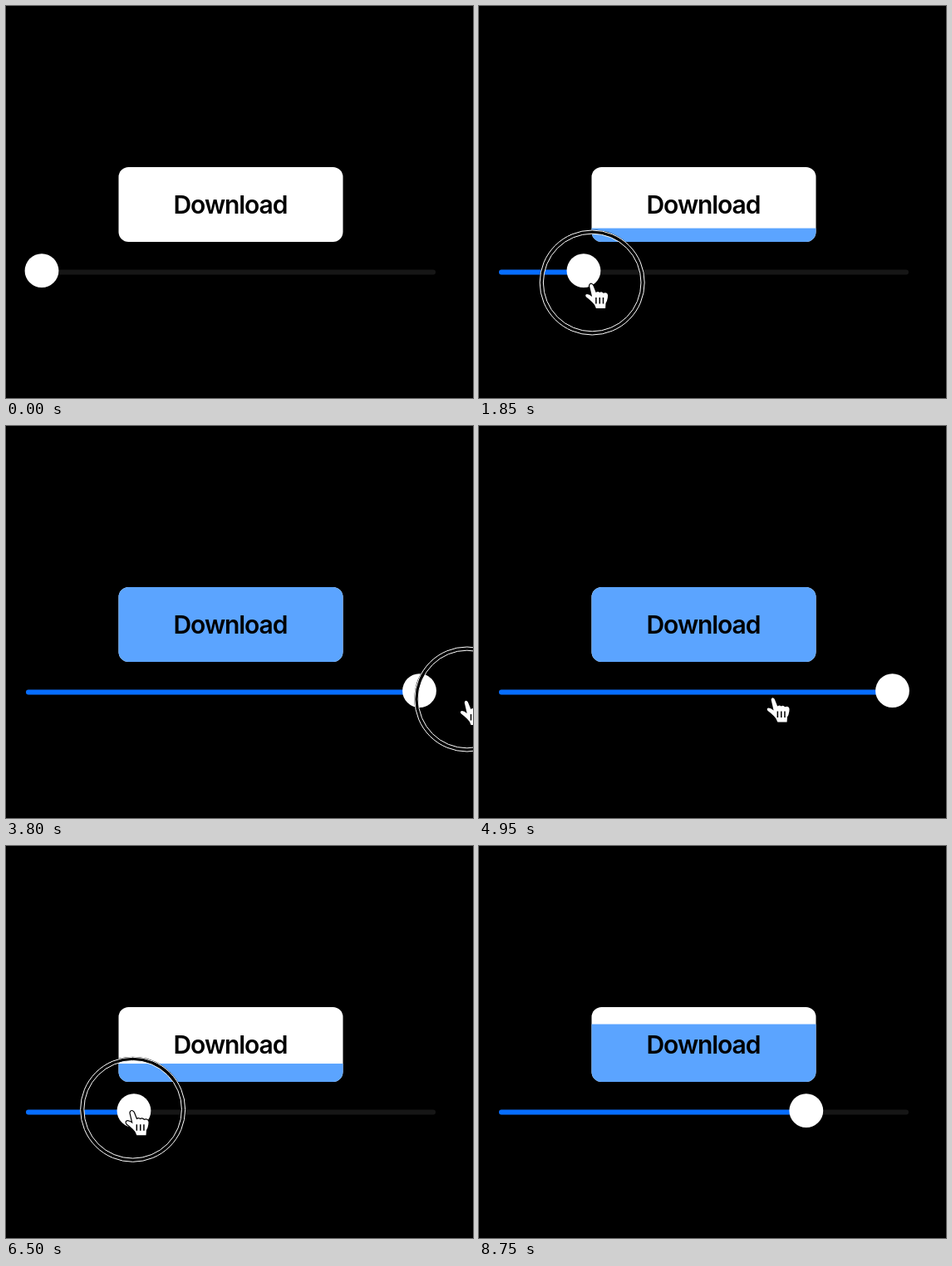
Write an HTML page that moves like this. It is 562 px wide and 472 px high and loops after 9.4 s.

```html
<!DOCTYPE html>
<html lang="en">
<head>
<meta charset="utf-8">
<title>Download slider</title>
<style>
  html, body { margin: 0; width: 100%; height: 100%; overflow: hidden; background: #000; }
  svg { display: block; width: 562px; height: 472px; }
  text { font: 580 30px Inter, "Liberation Sans", sans-serif; letter-spacing: -0.035em; }
</style>
</head>
<body>
<svg viewBox="0 0 562 472">
  <defs>
    <clipPath id="card"><rect x="135.5" y="194" width="270" height="90" rx="12"/></clipPath>
  </defs>
  <g clip-path="url(#card)">
    <rect x="135" y="194" width="271" height="90" fill="#fff"/>
    <rect id="level" x="135" y="284" width="271" height="91" fill="#5ba4ff"/>
  </g>
  <text x="270" y="250" text-anchor="middle">Download</text>
  <rect x="24" y="317.5" width="493" height="6" rx="3" fill="#161616"/>
  <rect id="bar" x="24" y="317.5" height="6" rx="3" fill="#066dff"/>
  <circle id="thumb" cy="318.7" r="20.4" fill="#fff"/>
  <g id="ring" fill="none">
    <circle r="61" stroke="#000" stroke-width="5"/>
    <circle r="63" stroke="#fff"/>
    <circle r="58.8" stroke="#fff"/>
  </g>
  <g id="hand">
    <path fill="#fff" stroke="#000" stroke-width="2.4" stroke-linejoin="round" paint-order="stroke"
      d="M-1.6 2Q-1 -.8 1 0Q2.6 .6 3 2.4L6 10Q8.5 7.8 10.4 10Q13 8.2 15 10.8Q18 9.2 19.8 11.6Q20.8 13 20.2 16Q19.6 20.5 17.8 23L17.4 29H6.2Q5 24.5 1.5 21.5Q-2 18 -5.8 15.2Q-7.6 12.4 -4.6 12Q-2 12.2 1.4 15Z"/>
    <path d="M6.2 16V23.5M10.6 16V23.5M14.8 16V23.5" stroke="#000" stroke-width="1.5"/>
  </g>
</svg>
<script>
  const LOOP = 9400, STEP = 50, LAG = 15;
  const MIN = 43, MAX = 497.5, GRIP = 5.5;
  const SHOW = 250, HIDE = 8750;

  // each move eases from the last place to the next; gaps are rests
  const origin = { x: 304, y: 599 };
  const moves = [
    { from: -700, to: 1200, x: 48, y: 333 },
    { from: 1360, to: 3070, x: 490.5, y: 333 },
    { from: 3350, to: 3650, x: 583, y: 329 },
    { from: 3650, to: 4450, x: 278, y: 329 },
    { from: 4450, to: 4700, x: 328, y: 327.5 },
    { from: 4770, to: 5500, x: 503, y: 314.3 },
    { from: 5650, to: 6840, x: 66, y: 318 },
    { from: 6840, to: 7850, x: 399.3, y: 290 },
    { from: 8500, to: 8700, x: 247.5, y: 107 }
  ];

  // the thumb follows until "drop", the ring stays until "up"
  const presses = [
    { down: 1350, drop: 3600, up: 4700 },
    { down: 5500, drop: 8250, up: 8250 }
  ];

  const $ = id => document.getElementById(id);
  const clamp = (v, a, b) => Math.min(b, Math.max(a, v));
  const ease = u => u * u * (3 - 2 * u);

  function pointer(t) {
    let { x, y } = origin;
    for (const m of moves) {
      const k = ease(clamp((t - m.from) / (m.to - m.from), 0, 1));
      x += (m.x - x) * k;
      y += (m.y - y) * k;
    }
    return { x, y };
  }

  function thumbX(t) {
    const p = presses.filter(p => t >= p.down).pop();
    if (!p) return MIN;
    return clamp(pointer(Math.min(t, p.drop) - LAG).x - GRIP, MIN, MAX);
  }

  function ringScale(t) {
    const p = presses.find(p => t >= p.down && t < p.up);
    if (!p) return 0;
    return t - p.down < STEP || p.up - t <= STEP ? 0.725 : 1;
  }

  function place(id, shown, transform) {
    $(id).style.display = shown ? "" : "none";
    $(id).setAttribute("transform", transform);
  }

  function draw(t) {
    const { x, y } = pointer(t), tx = thumbX(t), s = ringScale(t);
    $("thumb").setAttribute("cx", tx);
    $("bar").setAttribute("width", tx - 24);
    $("level").setAttribute("y", 284 - 90 * (tx - MIN) / (MAX - MIN));
    place("ring", s > 0, `translate(${x} ${y}) scale(${s})`);
    place("hand", t >= SHOW && t < HIDE, `translate(${x - 1.5} ${y + 2})`);
  }

  const start = performance.now();
  function tick() {
    const t = (performance.now() - start) % LOOP;
    draw(Math.floor(t / STEP) * STEP);
    requestAnimationFrame(tick);
  }
  tick();
</script>
</body>
</html>
```
